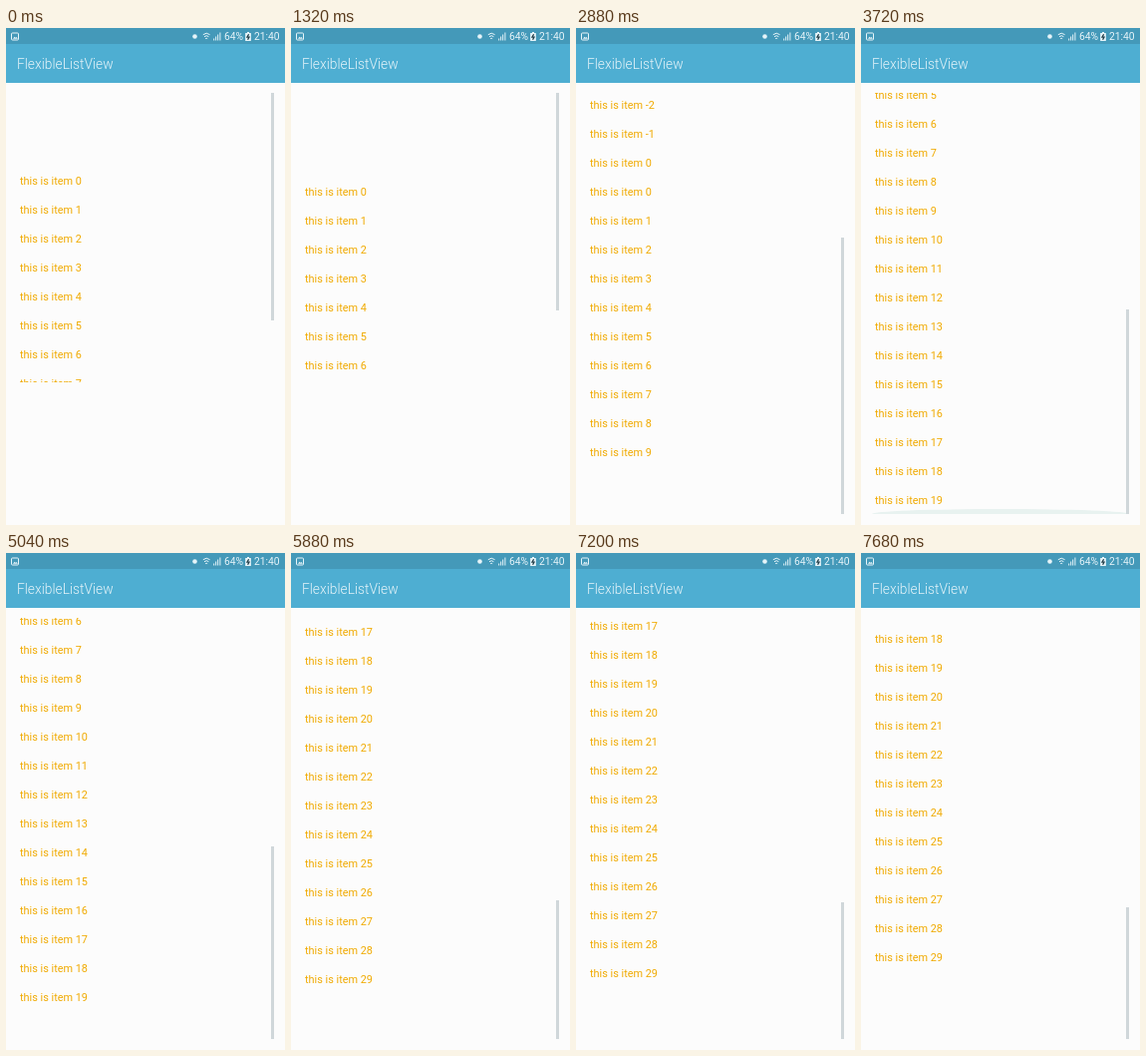
Recreate the animation shown at these times as an HTML page. Size 280 by 498 pixels, loop 7.8 s.

```html
<!DOCTYPE html>
<html lang="en">
<head>
<meta charset="utf-8">
<title>FlexibleListView</title>
<style>
  html, body { margin: 0; width: 100%; height: 100%; overflow: hidden; background: #fcfcfc; }
  body { position: relative; font-family: Roboto, sans-serif; color: #e6f4f9; }
  div, svg, span { position: absolute; white-space: nowrap; }
  .status { left: 0; top: 0; width: 280px; height: 16px; background: #4499b9; }
  .status span { top: 0; line-height: 18px; font-size: 10.3px; }
  .bar { left: 0; top: 16px; width: 280px; height: 39px; background: #4eaed2; }
  .bar span { left: 11px; top: 0; line-height: 40px; font-size: 13.8px; font-weight: 300; }
  #list { left: 11px; top: 65px; width: 258px; overflow: hidden; }
  #rows { left: 3px; top: 1px; }
  #rows p { margin: 0; height: 29px; font-size: 10.9px; line-height: 29px; color: #f0aa00; }
  #thumb { left: 266px; width: 3px; background: #d0d7da; }
  #glow { left: 11px; top: 482px; width: 258px; height: 5px; background: #e8f2f0;
          border-radius: 50% 50% 0 0 / 100% 100% 0 0; }
</style>
</head>
<body>
<div class="status">
  <svg width="280" height="16" fill="none" stroke="#e6f4f9">
    <rect x="5.5" y="5" width="7" height="7" rx="1"/>
    <path d="M7 10.8l1.5-2 1.2 1 .9-.8 1.2 1.8z" fill="#e6f4f9" stroke="none"/>
    <circle cx="189.5" cy="8.5" r="2.3" fill="#e6f4f9" stroke="none"/>
    <path d="M197.8 6.7q3.4-3 6.8 0M199 8.7q2.2-2 4.4 0M200.2 10.7q1-.9 2 0"/>
    <path d="M208.7 12.5v-2M210.7 12.5v-4M212.7 12.5v-6M214.9 12.5v-8"/>
    <rect x="240.7" y="5.5" width="4.6" height="7" fill="#e6f4f9"/>
    <path d="M242 4.5h2"/>
    <path d="M243.6 6.3l-1.6 2.8h2l-1.4 2.6" stroke="#223d48" stroke-width="1.3"/>
  </svg>
  <span style="left:219px">64%</span>
  <span style="left:249px">21:40</span>
</div>
<div class="bar"><span>FlexibleListView</span></div>
<div id="list"><div id="rows"></div></div>
<div id="glow"></div>
<div id="thumb"></div>
<script>
const LOOP = 7800, HOLD = 1080, STEP = 120, SETTLE = 480, FADE = 700;
const TOP = 65, VIEW = 422, ROW = 29, BATCH = 10;
const $ = id => document.getElementById(id);
const list = $('list'), rows = $('rows'), thumb = $('thumb'), glow = $('glow');
const clamp = x => Math.min(1, Math.max(0, x));

// Each drag stretches the list until it loads a batch, then springs back.
const drags = [
  { start: -230, load: 1680, reach: 88 },
  { start: 2640, load: 3240, reach: -82 },
  { start: 4835, load: 5760, reach: -82 },
  { start: 6470, load: LOOP, reach: -69 }
];

function pullAt(t) {
  const { start, load, reach } = drags.find(d => t < d.load + SETTLE);
  return t < load
    ? reach * Math.sin(Math.PI / 2 * clamp((t - start) / (load - start)))
    : reach * (1 - (t - load) / SETTLE) ** 2;
}

// The glow appears at the end of the list once a lower batch has settled.
function glowAt(t, loads) {
  if (loads < 2) return 0;
  const since = t - drags[loads - 1].load - SETTLE;
  return since < 0 ? 0 : clamp(1 - since / FADE);
}

// ten older items (-9..0) go above the items 0..29
for (let i = 0; i < 4 * BATCH; i++) {
  const p = document.createElement('p');
  p.textContent = 'this is item ' + (i < BATCH ? i - 9 : i - BATCH);
  rows.append(p);
}

function draw(t) {
  const loads = drags.filter(d => t >= d.load).length;
  const first = loads ? 0 : BATCH;
  const last = BATCH * Math.max(2, loads + 1);
  const total = (last - first) * ROW;
  const height = Math.min(VIEW, total);
  const pull = pullAt(t);
  const offset = clamp((t - 2160) / 360) * (total - height);

  [...rows.children].forEach((row, i) => row.hidden = i < first || i >= last);
  list.style.height = height + 'px';
  rows.style.transform = `translateY(${Math.round(pull - offset)}px)`;

  const size = (height - Math.abs(pull) * .85) / total * height;
  const y = pull < 0 ? height - size : offset / total * height;
  thumb.style.top = TOP + y + 'px';
  thumb.style.height = size + 'px';
  glow.style.opacity = glowAt(t, loads);
}

const start = performance.now();
function tick() {
  const t = (performance.now() - start) % LOOP;
  draw(Math.max(HOLD - STEP, Math.floor(t / STEP) * STEP));
  requestAnimationFrame(tick);
}
tick();
</script>
</body>
</html>
```
